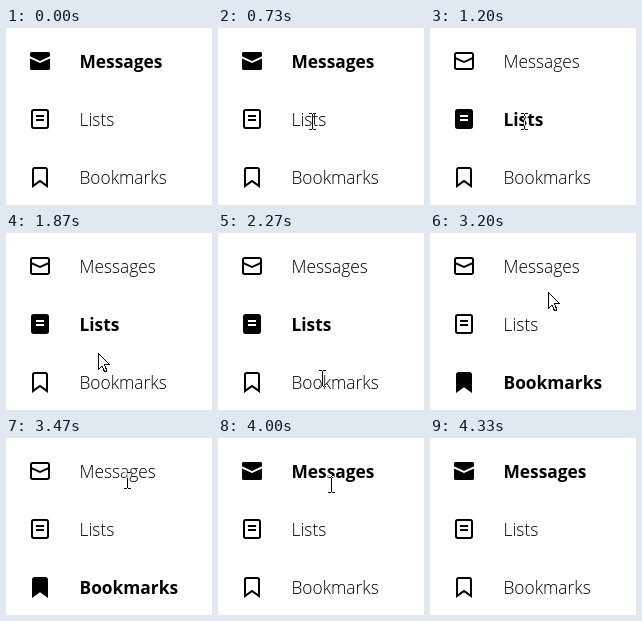
Write an HTML page that moves like this. It is 206x177 px and loops after 4.94 s.

```html
<!DOCTYPE html>
<html lang="en">
<head>
<meta charset="utf-8">
<title>Menu</title>
<style>
html, body { margin: 0; width: 100%; height: 100%; overflow: hidden; background: #fff; }
#stage { position: relative; width: 206px; height: 177px; overflow: hidden; background: #fff; isolation: isolate; }
.row { position: absolute; left: 22px; height: 24px; color: #000; }
.row svg { position: absolute; left: 0; top: 0; }
.row span { position: absolute; left: 51.5px; top: 0; font: 300 17.33px/24px "Open Sans", sans-serif; white-space: nowrap; }
.row .on { display: none; }
.row.active .on { display: block; }
.row.active .off { display: none; }
.row.active span { font-weight: 700; }
.cursor { position: absolute; left: 0; top: 0; visibility: hidden; }
#beam { mix-blend-mode: difference; }
</style>
</head>
<body>
<div id="stage">
  <div class="row" style="top:21px">
    <svg width="24" height="24">
      <path class="off" d="M2 5.5C2 4.12 3.12 3 4.5 3h15C20.88 3 22 4.12 22 5.5v13c0 1.38-1.12 2.5-2.5 2.5h-15C3.12 21 2 19.88 2 18.5zM4.5 5c-.28 0-.5.22-.5.5v2.76l8 3.64 8-3.64V5.5c0-.28-.22-.5-.5-.5zM20 10.46l-8 3.64-8-3.64v8.04c0 .28.22.5.5.5h15c.28 0 .5-.22.5-.5z"/>
      <path class="on" d="M2 4.5C2 3.67 2.67 3 3.5 3h17c.83 0 1.5.67 1.5 1.5v2.86L12 11.9 2 7.36zM2 9.55v9.95c0 .83.67 1.5 1.5 1.5h17c.83 0 1.5-.67 1.5-1.5V9.55L12 14.1z"/>
    </svg>
    <span>Messages</span>
  </div>
  <div class="row" style="top:79px">
    <svg width="24" height="24" fill-rule="evenodd">
      <path class="off" d="M3 4.5C3 3.12 4.12 2 5.5 2h13C19.88 2 21 3.12 21 4.5v15c0 1.38-1.12 2.5-2.5 2.5h-13C4.12 22 3 20.88 3 19.5zM5.5 4c-.28 0-.5.22-.5.5v15c0 .28.22.5.5.5h13c.28 0 .5-.22.5-.5v-15c0-.28-.22-.5-.5-.5zM8 8h8v2H8zM8 12h8v2H8z"/>
      <path class="on" d="M3 4.5C3 3.12 4.12 2 5.5 2h13C19.88 2 21 3.12 21 4.5v15c0 1.38-1.12 2.5-2.5 2.5h-13C4.12 22 3 20.88 3 19.5zM8 8h8v2H8zM8 12h8v2H8z"/>
    </svg>
    <span>Lists</span>
  </div>
  <div class="row" style="top:137px">
    <svg width="24" height="24" fill-rule="evenodd">
      <path class="off" d="M4 4.5C4 3.12 5.12 2 6.5 2h11C18.88 2 20 3.12 20 4.5v18.44l-8-5.71-8 5.71zM6.5 4c-.28 0-.5.22-.5.5v14.56l6-4.29 6 4.29V4.5c0-.28-.22-.5-.5-.5z"/>
      <path class="on" d="M4 4.5C4 3.12 5.12 2 6.5 2h11C18.88 2 20 3.12 20 4.5v18.44l-8-5.71-8 5.71z"/>
    </svg>
    <span>Bookmarks</span>
  </div>
  <svg class="cursor" id="arrow" width="13" height="20">
    <path d="M.5 .5V16.5L4 13 6.5 18.5H8.5V16.5L6.5 12V11.5H11.5Z" fill="#fff" stroke="#000" shape-rendering="crispEdges"/>
  </svg>
  <svg class="cursor" id="beam" width="7" height="17">
    <path d="M0 .5H3M4 .5H7M3.5 1V16M0 16.5H3M4 16.5H7" stroke="#fff" shape-rendering="crispEdges"/>
  </svg>
</div>
<script>
const LOOP = 4940, STEP = 1000 / 15;
const rows = [...document.querySelectorAll('.row')];
const arrow = document.getElementById('arrow');
const beam = document.getElementById('beam');

const linear = k => k;
const easeIn = k => k ** 1.5;
const easeOut = k => 1 - (1 - k) ** 1.8;
const easeInOut = k => (1 - Math.cos(Math.PI * k)) / 2;

// Pointer moves between steps; each bends towards `via`
const moves = [
  { start: 6, end: 11, from: [169, 118], via: [131, 105], to: [94, 93], ease: easeOut },
  { start: 23, end: 34, from: [94, 93], via: [86, 128], to: [104, 145], ease: easeInOut },
  { start: 37, end: 41, from: [104, 145], via: [106, 145], to: [108, 144], ease: linear },
  { start: 41, end: 52, from: [108, 144], via: [112, 93], to: [121, 42], ease: easeOut },
  { start: 57, end: 64, from: [121, 42], via: [117, 28], to: [42, 164], ease: easeIn }
];
const clicks = [0, 18, 37, 56];

// Source times are whole hundredths of a second
function stepAt(t) {
  const n = Math.floor((t + 4) / STEP);
  return Math.round(n * STEP / 10) * 10 > t ? n - 1 : n;
}

function pointAt(n) {
  const m = moves.filter(m => m.start <= n).pop();
  if (!m || n > moves[moves.length - 1].end) return null;
  const k = m.ease(Math.min(1, (n - m.start) / (m.end - m.start))), r = 1 - k;
  return m.from.map((a, i) => Math.round(r * r * a + 2 * r * k * m.via[i] + k * k * m.to[i]));
}

function overText([x, y]) {
  return rows.some(row => {
    const label = row.lastElementChild, left = row.offsetLeft + label.offsetLeft;
    return x >= left && x <= left + label.offsetWidth && Math.abs(y - row.offsetTop - 12) <= 14;
  });
}

function place(el, x, y, shown) {
  el.style.visibility = shown ? 'visible' : 'hidden';
  el.style.transform = `translate(${x}px, ${y}px)`;
}

function draw(t) {
  const n = stepAt(t);
  const active = (clicks.filter(c => c <= n).length - 1) % rows.length;
  rows.forEach((row, i) => row.classList.toggle('active', i === active));
  const p = pointAt(n), text = p && overText(p);
  const [x, y] = p || [0, 0];
  place(arrow, x, y, p && !text);
  place(beam, x - 3, y - 8, text);
}

const start = performance.now();
function tick() {
  draw((performance.now() - start) % LOOP);
  requestAnimationFrame(tick);
}
tick();
</script>
</body>
</html>
```
